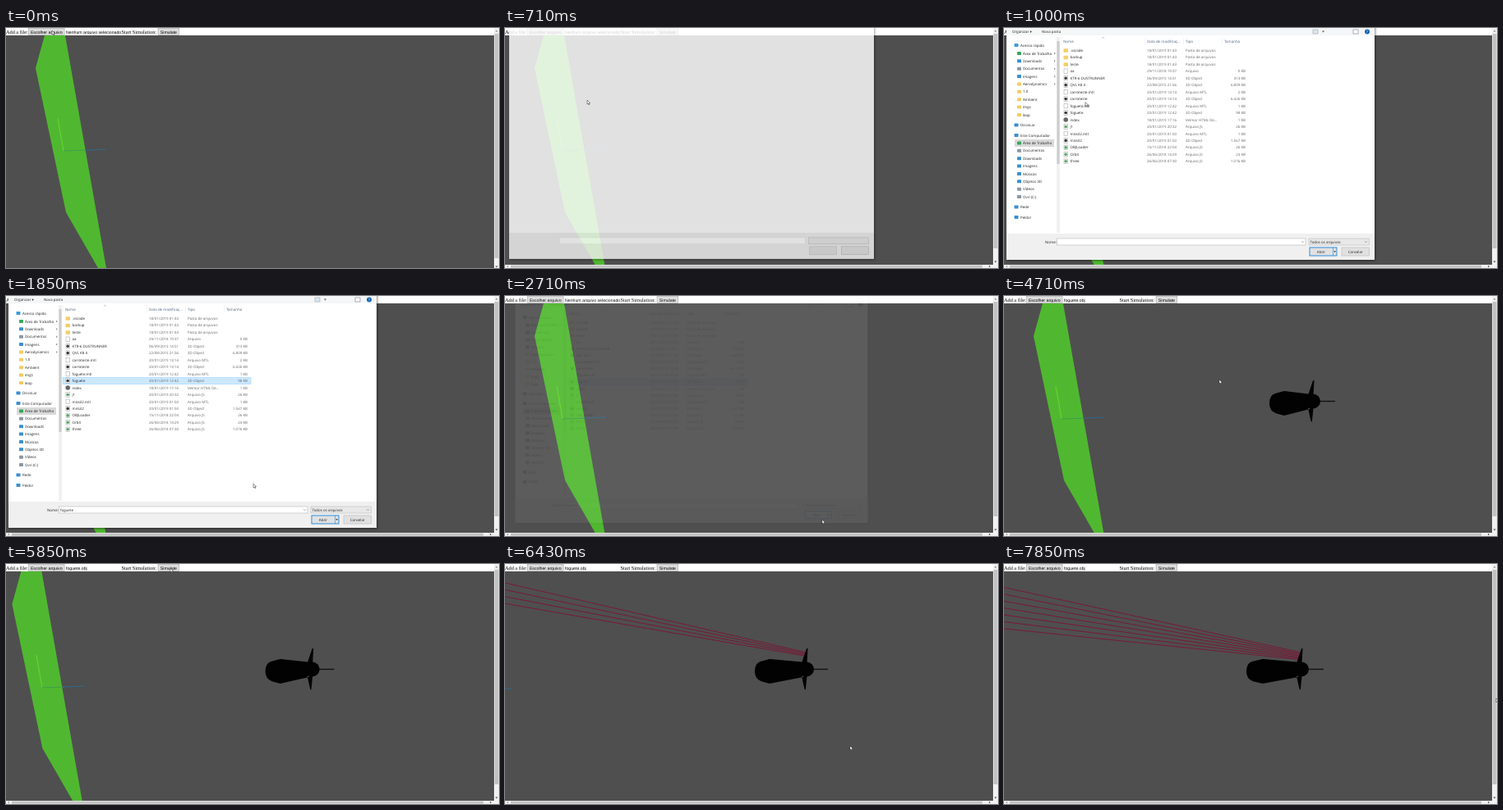
Recreate the animation shown at these times as an HTML page. Size 600x293 px, loop 8000 ms.

```html
<!DOCTYPE html>
<html lang="pt">
<head>
<meta charset="utf-8">
<style>
  html, body { margin: 0; width: 100%; height: 100%; overflow: hidden; background: #fff; }
  svg { display: block; width: 600px; height: 293px; }
  text { text-rendering: geometricPrecision; white-space: pre; }
  .serif { font: 6.25px "Liberation Serif", serif; }
  .sans { font: 5.2px "Liberation Sans", sans-serif; }
  .ui { font: 4.45px "Open Sans", sans-serif; fill: #222; }
  #dialog { transform-origin: 227px 137px; filter: drop-shadow(1px 1px 1.5px #0007); }
</style>
</head>
<body>
<svg id="stage" viewBox="0 0 600 293"></svg>
<script>
const LOOP = 8000, FPS = 7;
const NS = 'http://www.w3.org/2000/svg';
const stage = document.getElementById('stage');

function add(parent, tag, attrs = {}, content) {
  const el = document.createElementNS(NS, tag);
  for (const name in attrs) el.setAttribute(name, attrs[name]);
  if (content !== undefined) el.textContent = content;
  return parent.appendChild(el);
}
const group = (parent, attrs) => add(parent, 'g', attrs);
const rect = (parent, x, y, width, height, fill, more) =>
  add(parent, 'rect', { x, y, width, height, fill, ...more });
const path = (parent, d, fill, more) => add(parent, 'path', { d, fill, ...more });
const dot = (parent, cx, cy, r, fill) => add(parent, 'circle', { cx, cy, r, fill });
const label = (parent, kind, x, y, content, more) =>
  add(parent, 'text', { class: kind, x, y, ...more }, content);
const show = (el, on) => el.setAttribute('visibility', on ? 'inherit' : 'hidden');
const outline = (color, width = 0.5) => ({ stroke: color, 'stroke-width': width });

// Linear interpolation in rows of [step, value, value...]
function tween(rows, k) {
  const next = rows.findIndex(row => row[0] > k);
  if (next === 0) return rows[0].slice(1);
  if (next < 0) return rows[rows.length - 1].slice(1);
  const a = rows[next - 1], b = rows[next], p = (k - a[0]) / (b[0] - a[0]);
  return a.slice(1).map((v, i) => v + (b[i + 1] - v) * p);
}

// 3D view
rect(stage, 0, 0, 600, 293, '#4f4f4f');
const plane = path(stage, 'M47 9H72L122 293H112L73 225L36 49Z', '#50b830');
const axes = group(stage, { fill: 'none', 'stroke-width': 0.9 });
path(axes, 'M63 110L70 150', 'none', { stroke: '#68dc2c' });
path(axes, 'M70 150L96 149.2', 'none', { stroke: '#3c9a50' });
path(axes, 'M96 149.2L122 148', 'none', { stroke: '#2c6c94' });
const trails = Array.from({ length: 7 }, () =>
  add(stage, 'line', { stroke: '#7c1434', 'stroke-width': 0.9 }));
const rocket = group(stage);
const rocketShape = path(rocket, '', '#030203');
const antenna = path(rocket, '', 'none', { stroke: '#101010', 'stroke-width': 1.3 });
const tailCap = dot(rocket, 0, 128.5, 9, '#030203');

// Page header
rect(stage, 0, 0, 600, 9, '#fff');
label(stage, 'serif', 0, 6.5, 'Add a file:');
label(stage, 'serif', 140.5, 6.5, 'Start Simulation:');
function pageButton(x, width, content) {
  rect(stage, x, 0.6, width, 8, '#ddd', outline('#999'));
  label(stage, 'sans', x + width / 2, 6.5, content, { 'text-anchor': 'middle' });
}
pageButton(27.3, 43.8, 'Escolher arquivo');
pageButton(185, 25.8, 'Simulate');
const fileName = label(stage, 'sans', 73, 6.5, '');

// Page scrollbars
rect(stage, 594, 0, 6, 293, '#f1f1f1');
const vThumb = rect(stage, 594.6, 7, 4.8, 274, '#c1c1c1');
path(stage, 'M595.5 4.5h3l-1.5 -2z', '#888');
const vArrow = path(stage, 'M595.5 0h3l-1.5 2z', '#505050');
const hBar = group(stage);
rect(hBar, 0, 289, 600, 4, '#f1f1f1');
rect(hBar, 7, 289.6, 574, 3, '#c1c1c1');
path(hBar, 'M4 289.7v2.6l-2 -1.3z', '#999');
path(hBar, 'M589 289.7v2.6l2 -1.3z', '#505050');

// File dialog
const dialog = group(stage, { id: 'dialog' });
rect(dialog, 3, -8, 448, 291, '#fff');
rect(dialog, 3, 251, 448, 32, '#f0f0f0');
const nameField = rect(dialog, 64.5, 257, 302.5, 8, '#fff', outline('#aaa'));
rect(dialog, 371, 257, 73.5, 8, '#e8e8e8', outline('#b4b4b4'));
const openButton = rect(dialog, 372, 268, 33, 10, '#e1e1e1', outline('#0078d7', 0.8));
rect(dialog, 411, 268, 33.5, 10, '#e1e1e1', outline('#adadad'));

const content = group(dialog);
rect(content, 3, -8, 448, 17, '#f5f6f7');
label(content, 'ui', 10, 6, 'Organizar ▾', { fill: '#1e395b' });
label(content, 'ui', 46, 6, 'Nova pasta');
rect(content, 376, 2, 6, 5, '#dde6ee', outline('#8a9aa8'));
path(content, 'M387 3.5h3l-1.5 2z', '#555');
rect(content, 425, 2, 6, 5, '#fff', outline('#667'));
dot(content, 442, 4.4, 3, '#1767b5');
label(content, 'ui', 441, 6, '?', { style: 'fill:#fff' });

const sideColors = { star: '#3e9be0', folder: '#f2cb61', blue: '#3b8fd0', grey: '#8a98a5', green: '#35a85a' };
function sideItem(y, name, color, level = 1) {
  const x = level ? 16 : 12.5;
  rect(content, x, y - 2, 5, 4, sideColors[color], { rx: 0.7 });
  label(content, 'ui', level ? 23 : 20, y + 1.6, name);
}
rect(content, 13, 136, 48, 9, '#d9d9d9');
sideItem(21, 'Acesso rápido', 'star', 0);
[['Área de Trabalho', 'green'], ['Downloads', 'blue'], ['Documentos', 'grey'], ['Imagens', 'blue'],
 ['Aerodynamics', 'folder'], ['1.0', 'folder'], ['Ambient', 'folder'], ['imgs', 'folder'], ['leap', 'folder']]
  .forEach(([name, color], i) => {
    sideItem(31 + i * 9.37, name, color);
    if (i < 5) rect(content, 61, 30 + i * 9.37, 1.3, 2, '#8a98a5');
  });
sideItem(118.5, 'DiscoLar', 'blue', 0);
sideItem(131, 'Este Computador', 'blue', 0);
[['Área de Trabalho', 'green'], ['Documentos', 'grey'], ['Downloads', 'blue'], ['Imagens', 'blue'],
 ['Músicas', 'blue'], ['Objetos 3D', 'blue'], ['Vídeos', 'grey'], ['Ovri (C:)', 'grey']]
  .forEach(([name, color], i) => sideItem(140.5 + i * 9.37, name, color));
sideItem(218.5, 'Rede', 'blue', 0);
sideItem(231, 'Peldo!', 'blue', 0);
rect(content, 64, 11, 4, 239, '#f0f0f0');
rect(content, 64.4, 16, 3.2, 150, '#cdcdcd');

[[72, 'Nome'], [174, 'Data de modificaç...'], [221, 'Tipo'], [268, 'Tamanho']]
  .forEach(([x, name]) => {
    label(content, 'ui', x, 17.5, name, { style: 'fill:#4c607a' });
    rect(content, x - 3, 11, 0.4, 9, '#e2e2e2');
  });
path(content, 'M119 12.5l1.5 -1.3l1.5 1.3', 'none', outline('#888'));

const FOLDER = 'Pasta de arquivos', MODEL = '3D Object', MTL = 'Arquivo MTL', JS = 'Arquivo JS';
const files = [
  ['.vscode', '18/01/2019 01:43', FOLDER],
  ['backup', '18/01/2019 01:43', FOLDER],
  ['teste', '18/01/2019 01:43', FOLDER],
  ['aa', '29/11/2018 19:37', 'Arquivo', '0 KB'],
  ['KTR-6 DUSTRUNNER', '06/09/2015 14:51', MODEL, '313 KB'],
  ['QVL K8 4', '22/08/2015 21:56', MODEL, '6.809 KB'],
  ['carroteste.mtl', '20/01/2019 13:14', MTL, '2 KB'],
  ['carroteste', '20/01/2019 13:14', MODEL, '6.426 KB'],
  ['foguete.mtl', '20/01/2019 12:42', MTL, '1 KB'],
  ['foguete', '20/01/2019 12:42', MODEL, '98 KB'],
  ['index', '18/01/2019 17:16', 'Velmor HTML De...', '1 KB'],
  ['j1', '20/01/2019 20:32', JS, '26 KB'],
  ['missil2.mtl', '20/01/2019 01:50', MTL, '1 KB'],
  ['missil2', '20/01/2019 01:50', MODEL, '1.567 KB'],
  ['OBJLoader', '15/11/2018 22:04', JS, '26 KB'],
  ['Orbit', '26/06/2018 14:29', JS, '23 KB'],
  ['three', '26/06/2018 07:30', JS, '1.076 KB'],
];
const rowY = i => 27.3 + i * 8.47;
const selection = rect(content, 69, rowY(9) - 4.2, 229, 8.4, '#cce8ff', outline('#99d1ff'));
function fileIcon(y, type) {
  if (type === FOLDER) return rect(content, 72.5, y - 2, 5.5, 4.4, '#f4cf69', { rx: 0.5 });
  if (type.startsWith('Velmor')) return dot(content, 75.2, y, 2.8, '#666');
  rect(content, 73, y - 2.8, 4.4, 5.6, '#fff', outline('#9a9a9a'));
  if (type === MODEL) dot(content, 75.2, y, 1.8, '#3a3a3a');
  if (type === JS) dot(content, 75.2, y, 1.8, '#58a868');
}
files.forEach(([name, date, type, size = ''], i) => {
  const y = rowY(i), soft = { style: 'fill:#666' };
  fileIcon(y, type);
  label(content, 'ui', 80.5, y + 1.6, name);
  label(content, 'ui', 174, y + 1.6, date, soft);
  label(content, 'ui', 221, y + 1.6, type, soft);
  label(content, 'ui', 294, y + 1.6, size, { ...soft, 'text-anchor': 'end' });
});
label(content, 'ui', 50, 262.7, 'Nome:');
const typedName = label(content, 'ui', 66, 262.7, 'foguete');
path(content, 'M362 260.3l1.5 1.5l1.5 -1.5M439 260.3l1.5 1.5l1.5 -1.5', 'none', outline('#555'));
label(content, 'ui', 372.5, 262.7, 'Todos os arquivos');
label(content, 'ui', 386, 274.6, 'Abrir', { 'text-anchor': 'middle' });
rect(content, 400, 268, 0.5, 10, '#0078d7');
path(content, 'M401.3 272.2h2.6l-1.3 1.8z', '#222');
label(content, 'ui', 427.7, 274.6, 'Cancelar', { 'text-anchor': 'middle' });

const cursor = path(stage, 'M0 0V5L1.2 4L2 5.8L2.9 5.4L2.1 3.7H3.6Z', '#fff',
  { ...outline('#111', 0.45), 'stroke-linejoin': 'round' });

// Motion tables; the first value of each row is a step of 1/7 s
const cursorPath = [[0, 56, 3], [3, 57, 4], [5, 100, 88], [9, 98, 93], [10, 96, 101], [11, 110, 106],
  [13, 301, 229], [16, 386, 273], [19, 386, 273], [24, 386, 273], [29, 300, 150], [33, 262, 102],
  [35, 420, 130], [36, 536, 150], [38, 330, 70], [40, 198, 4], [41, 200, 5], [45, 420, 222],
  [48, 526, 200], [52, 570, 180], [55, 599, 164]];
const dialogPath = [[4, 0, 0.975], [5, 0.83, 0.991], [6, 1, 1], [17, 1, 1], [18, 0.55, 0.98],
  [19, 0.07, 0.957], [20, 0, 0.95]];
const sceneShift = [[39, 0], [40, -4], [45, -114], [47, -150]];
// Nose, shoulder, tail and antenna tip of the rocket
const rocketPath = [[39, 323, 341, 376, 403], [42, 312, 330, 371, 397.5], [45, 304, 322, 367, 393],
  [49, 299.5, 318, 364, 390.6], [55, 295, 315, 362, 389]];
const trailTop = [[45, 23], [55, 28.5]];

function drawRocket(k) {
  const [nose, shoulder, tail, tip] = tween(rocketPath, k);
  rocketShape.setAttribute('d',
    `M${nose} 131.5Q${nose} 121 ${nose + 7} 119L${shoulder} 116L${tail - 4} 119.7` +
    `V138L${shoulder} 146L${nose + 8} 143.3Q${nose} 140 ${nose} 131.5Z` +
    `M${tail - 6} 121L${tail} 103.2L${tail + 1.5} 103L${tail + 0.5} 121Z` +
    `M${tail - 6} 137L${tail - 2.4} 153L${tail - 1.2} 153.5L${tail + 0.5} 137Z`);
  tailCap.setAttribute('cx', tail);
  antenna.setAttribute('d', `M${tail} 128.5H${tip}`);

  const count = k < 42 ? 0 : k <= 45 ? k - 41 : Math.min(7, 4 + Math.floor((k - 45) / 3));
  const [top] = tween(trailTop, k);
  trails.forEach((line, i) => {
    show(line, i < count);
    const ends = { x1: 0, y1: top + 8.4 * i, x2: tail - 0.5 - 0.6 * i, y2: 108 + 1.4 * i };
    for (const name in ends) line.setAttribute(name, ends[name]);
  });
}

function draw(time) {
  const k = Math.floor((time % LOOP + 8) * FPS / 1000) % 56;
  const loaded = k >= 27;

  const [shift] = tween(sceneShift, k);
  plane.setAttribute('transform', `translate(${shift * 1.1} 0)`);
  axes.setAttribute('transform', `translate(${shift} ${shift * -0.035})`);
  show(rocket, loaded);
  drawRocket(k);
  fileName.textContent = loaded ? 'foguete.obj' : 'Nenhum arquivo selecionado';

  const hasBar = k > 0;
  show(hBar, hasBar);
  vThumb.setAttribute('height', hasBar ? 262 : 274);
  vArrow.setAttribute('transform', `translate(0 ${hasBar ? 284.5 : 290.5})`);

  const [opacity, scale] = tween(dialogPath, k);
  dialog.style.opacity = opacity;
  dialog.style.transform = `scale(${scale})`;
  show(dialog, opacity > 0);
  show(content, k >= 6);
  show(selection, k >= 10);
  show(typedName, k >= 10);
  nameField.setAttribute('stroke', k >= 6 ? '#aaa' : '#ddd');
  openButton.setAttribute('fill', k >= 16 ? '#e5f1fb' : '#e1e1e1');
  openButton.setAttribute('stroke', k >= 6 ? '#0078d7' : '#ccc');

  const [x, y] = tween(cursorPath, k);
  cursor.setAttribute('transform', `translate(${x} ${y})`);
}

const start = performance.now();
function tick() {
  draw(performance.now() - start);
  requestAnimationFrame(tick);
}
tick();
</script>
</body>
</html>
```
